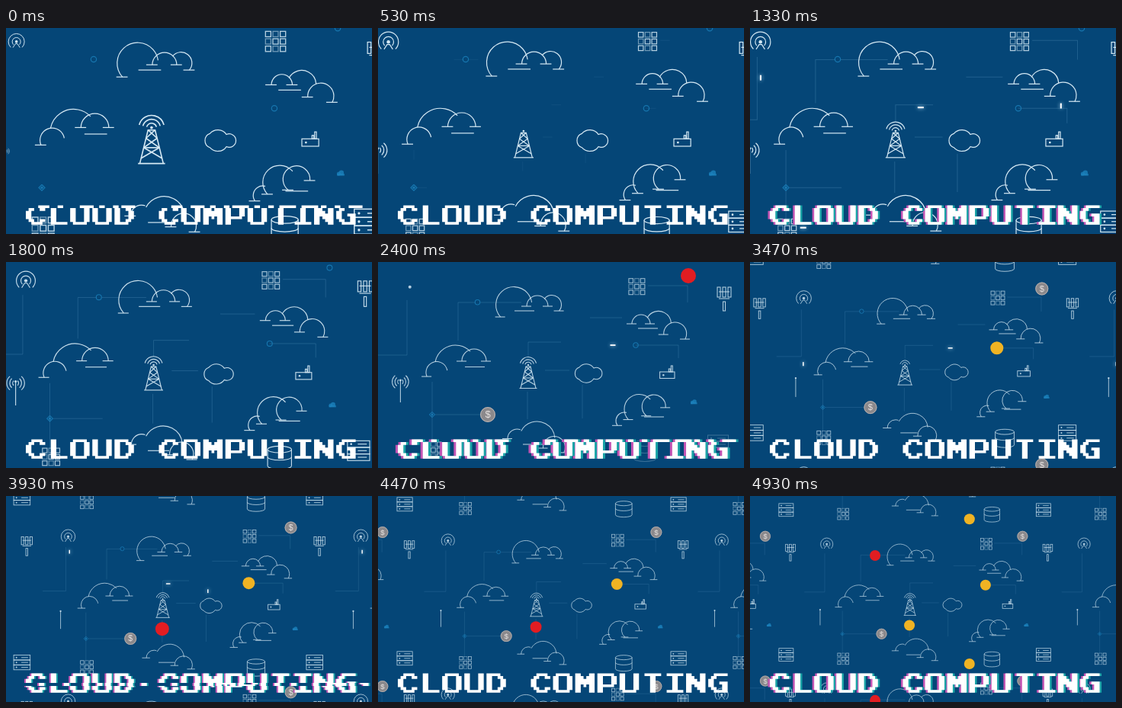
Animation of 480x270 px, one loop 4.99 s. Source, as an HTML page with a canvas:

```html
<!DOCTYPE html>
<html lang="en">
<head>
<meta charset="utf-8">
<title>Cloud computing</title>
<style>
html, body { margin: 0; width: 100%; height: 100%; overflow: hidden; background: #054677; }
canvas { display: block; width: 100vw; height: 100vh; }
</style>
</head>
<body>
<canvas id="stage" width="480" height="270">CLOUD COMPUTING</canvas>
<script>
const c = document.getElementById('stage').getContext('2d');
const LOOP = 4990, STEP = 66.6, W = 480, H = 270;
const BG = '#054677', INK = '#d6e9f4', DIM = '#1c82bd';
const RED = '#e21d22', GREY = '#8b898c', GOLD = '#f0b323';

const clamp = (v, lo = 0, hi = 1) => Math.min(hi, Math.max(lo, v));

// Linear interpolation through [time, value] keys
function key(t, keys) {
  let i = 1;
  while (i < keys.length - 1 && t > keys[i][0]) i++;
  const [t0, a] = keys[i - 1], [t1, b] = keys[i];
  return a + (b - a) * clamp((t - t0) / (t1 - t0));
}

const ZOOM = [[1330, 1.142], [2400, 1], [3130, .895], [3930, .8], [4930, .703]];

// Clouds: lobes [x, y, radius, from degree, to degree] and the start of the shading line
const CLOUDS = [
  { lobes: [[178.2, 56.2, 23.6, 138, 352], [209, 58, 14, 180, 360], [228, 56, 12.5, 218, 400]], shade: [179, 64] },
  { lobes: [[345, 81, 12, 180, 360], [367.8, 81, 16.6, 208, 356], [389.7, 94, 15, 176, 388]], shade: [341, 87] },
  { lobes: [[77, 144.6, 14, 157, 350], [101.6, 136, 27, 191, 316], [126, 130, 16, 180, 360]], shade: [114, 137.5] },
  { lobes: [[323, 208, 11, 145, 285], [342.5, 193, 19.5, 136, 319], [361.7, 189.5, 15.5, 128, 365]], shade: [349, 203] },
  { lobes: [[182.5, 231.5, 12.5, 180, 290], [208.5, 232.5, 23.5, 208, 355], [231, 243, 14.5, 176, 388]], shade: [190, 239] }
];

// Circuit elbows: x, y, horizontal run, vertical run
const ELBOWS = [
  [0, 122, 38, -72], [128, 53, -23, 50], [240, 105, -43, 20], [278, 73, 42, 0],
  [354, 31, 52, 22], [338, 109, 56, 17], [219, 142, 32, 0], [268, 161, 0, 44],
  [71, 157, 0, 80], [196, 170, 0, 36], [134, 53, 54, 0], [75, 200, 60, 0]
];

// Light pulses: x, y, the time they pass there, and whether they run sideways
const PULSES = [
  [387, 106, 1330, 0], [226, 108, 1330, 1], [42, 73.7, 1330, 0], [91, 246, 1330, 1],
  [308, 109, 2400, 1], [280, 109, 3130, 1], [41, 120, 3130, 0],
  [206, 110, 3930, 1], [44, 57.5, 3930, 0], [271, 122, 3930, 0]
];

// Coins: x, y, time of appearing, colour, then optionally a later time and colour
const COINS = [
  [407, 18, 2070, RED, 2700, GREY], [144, 200, 2000, GREY], [338, 109, 3040, GOLD],
  [196, 184, 3700, RED, 4500, GOLD], [132, 54, 4600, RED], [308, 256, 4600, GOLD]
];

// Title letters on a grid of 8 by 7 squares
const GLYPHS = {
  C: 'M2 0h4v1h1v1h-2v-1h-2v1h-1v3h1v1h2v-1h2v1h-1v1h-4v-1h-1v-1h-1v-3h1v-1h1z',
  L: 'M1 0h2v6h4v1h-6z',
  O: 'M1 0h5v1h1v5h-1v1h-5v-1h-1v-5h1zM2 1v5h3v-5z',
  U: 'M0 0h2v6h3v-6h2v6h-1v1h-5v-1h-1z',
  D: 'M0 0h5v1h1v1h1v3h-1v1h-1v1h-5zM2 1v5h2v-1h1v-3h-1v-1z',
  M: 'M0 0h2v1h1v1h1v-1h1v-1h2v7h-2v-3h-1v1h-1v-1h-1v3h-2z',
  P: 'M0 0h6v1h1v3h-1v1h-4v2h-2zM2 1v3h3v-3z',
  T: 'M1 0h6v1h-2v6h-2v-6h-2z',
  I: 'M1 0h6v1h-2v5h2v1h-6v-1h2v-5h-2z',
  N: 'M0 0h2v1h1v1h1v1h1v-3h2v7h-2v-1h-1v-1h-1v-1h-1v3h-2z',
  G: 'M2 0h5v1h-4v1h-1v3h1v1h2v-2h-1v-1h3v4h-5v-1h-1v-1h-1v-3h1v-1h1z'
};
const TITLE = new Path2D();
[...'CLOUD COMPUTING'].forEach((ch, i) =>
  GLYPHS[ch] && TITLE.addPath(new Path2D(GLYPHS[ch]), new DOMMatrix().translate(i * 8, 0)));

// Glitch bursts: time, colour fringe, top of the torn band, its shift
const BURSTS = [[0, 0, 232, 9], [2400, 3, 232, 11], [3130, 9, 245, 17], [3930, 2, 245, 17]];

function line(...p) {
  c.beginPath();
  for (let i = 0; i < p.length; i += 2) c.lineTo(p[i], p[i + 1]);
  c.stroke();
}
function arc(x, y, r, from = 0, to = 360) {
  c.beginPath();
  c.arc(x, y, r, from * Math.PI / 180, to * Math.PI / 180);
  c.stroke();
}
function dot(x, y, r) {
  c.beginPath();
  c.arc(x, y, r, 0, 7);
  c.fill();
}
// Draw around a pivot at a given size
function sized(x, y, k, draw) {
  c.save();
  c.translate(x, y);
  c.scale(k, k);
  draw();
  c.restore();
}

// Lobes that end at or below their centre stand on a short foot
function cloud({ lobes, shade: [sx, sy] }) {
  for (const [x, y, r, from, to] of lobes) {
    arc(x, y, r, from, to);
    for (const a of [from, to].map(d => d * Math.PI / 180)) {
      const fx = x + r * Math.cos(a), fy = y + r * Math.sin(a);
      if (fy > y - .1) line(fx - 7, fy, fx + 6, fy);
    }
  }
  line(sx, sy, sx + 26, sy);
}
const ROUND = new Path2D('M264 154A8.5 8.5 0 0 1 264 138A12 12 0 0 1 283 139A7.7 7.7 0 1 1 283 153A12 12 0 0 1 264 154z');

function tower(waves) {
  const half = y => 3 + (y + 9) / 28.5 * 7;
  const levels = [-9, -2, 6, 15];
  line(-10, 19.5, -3, -9, 3, -9, 10, 19.5);
  line(-11.5, 19.5, 11.5, 19.5);
  levels.slice(1).forEach((y, i) => {
    const top = levels[i], a = half(top), b = half(y);
    line(-a, top, b, y);
    line(a, top, -b, y);
  });
  line(-half(6), 6, half(6), 6);
  dot(0, -11, 1.2);
  for (let i = 1; i <= waves; i++) arc(0, -10.5, 1 + i * 3.3, 195, 345);
}
function grid() {
  for (let i = 0; i < 9; i++) {
    c.save();
    if (i % 2 && i !== 5) c.globalAlpha *= .6;
    c.strokeRect(-10.5 + i % 3 * 7.7, -10.5 + Math.floor(i / 3) * 7.7, 5.6, 5.6);
    c.restore();
  }
}
function server() {
  for (const y of [-12, -4, 4]) {
    c.strokeRect(-13.5, y, 27, 8);
    dot(-9, y + 4, 1.2);
    line(-1, y + 4, 10, y + 4);
  }
}
function database() {
  c.beginPath();
  c.ellipse(0, -10, 14.5, 4, 0, 0, 7);
  for (const y of [-1, 10]) {
    c.moveTo(14.5, y);
    c.ellipse(0, y, 14.5, 4, 0, 0, Math.PI);
  }
  c.stroke();
  for (const x of [-14.5, 14.5]) line(x, -10, x, 10);
}
function mast() {
  for (const x of [-9, -2, 5]) c.strokeRect(x, -16, 4, 13);
  for (const y of [-10, -1]) line(-7, y, 7, y);
  c.strokeRect(-1.5, 3, 3, 12);
}
function radio(open) {
  dot(0, 1, 2);
  if (!open) return;
  for (const r of [6, 11.5]) arc(0, 1, r, 135, 405);
  line(-5, 9.5, -1.5, 4, 1.5, 4, 5, 9.5);
}
function aerial(waves) {
  dot(0, -4, 1.4);
  line(0, -4, 0, 25);
  for (let i = 1; i <= waves; i++)
    for (const a of [0, 180]) arc(0, -2, i * 3.6, a - 50, a + 50);
}
function router() {
  c.strokeRect(-9.7, 0, 19.4, 8.5);
  dot(-5, 4.2, 1.2);
  c.strokeRect(2, -4, 2, 4);
  c.strokeRect(5, -8, 2, 8);
}

function markers() {
  c.strokeStyle = c.fillStyle = DIM;
  for (const [x, y] of [[130.5, 52.7], [338, 109], [410.8, 17]]) arc(x, y, 3.2);
  line(71, 196.5, 74.5, 200, 71, 203.5, 67.5, 200, 71, 196.5);
  dot(71, 200, 1.5);
  dot(412, 184, 2.2);
  dot(415, 183, 2.8);
  c.fillRect(410, 184, 8.5, 2.3);
}

function traces(t) {
  const p = clamp((t - 470) / 750);
  if (!p) return;
  c.save();
  c.strokeStyle = '#5f9cc4';
  c.globalAlpha = .1 + .2 * p;
  c.lineWidth = .9;
  c.setLineDash([130 * p, 400]);
  for (const [x, y, dx, dy] of ELBOWS) line(x, y, x + dx, y, x + dx, y + dy);
  c.restore();
}

function pulses(t) {
  c.save();
  c.fillStyle = '#fff';
  c.shadowColor = '#bfe6ff';
  c.shadowBlur = 5;
  for (const [x, y, at, flat] of PULSES) {
    const move = (t - at) * .04;
    if (Math.abs(move) > 16) continue;
    if (flat) c.fillRect(x - move - 3.5, y - .9, 7, 1.8);
    else c.fillRect(x - .9, y + move - 3, 1.8, 6);
  }
  c.restore();
}

function coins(t) {
  c.textAlign = 'center';
  c.textBaseline = 'middle';
  c.font = '13px Arial, "Liberation Sans", sans-serif';
  for (const [x, y, born, first, change, second] of COINS) {
    if (t < born) continue;
    const color = t >= change ? second : first;
    const size = key(t - born, [[0, .6], [80, 1.4], [300, 1]]);
    sized(x, y, size, () => {
      c.fillStyle = color;
      dot(0, 0, 10);
      if (color !== GREY) return;
      c.strokeStyle = '#c4bdba';
      c.lineWidth = .9;
      arc(0, 0, 9.4);
      c.fillStyle = '#e8e4e2';
      c.fillText('$', 0, .8);
    });
  }
}

function tile(t) {
  const pop = Math.max(0, 1 - t / 330) ** 2;
  const glow = key(t, [[1400, 1], [2300, .85]]);
  const hidden = clamp(1.5 - Math.abs(t - 2350) / 350);
  const waves = Math.min(3, Math.round(4.5 * Math.abs(Math.sin(Math.PI * (t - 530) / 2600))));
  c.lineWidth = 1.05;
  traces(t);
  c.globalAlpha = .8;
  markers();

  c.globalAlpha = glow;
  c.strokeStyle = c.fillStyle = INK;
  for (const shape of CLOUDS) {
    c.save();
    c.translate(pop * 600 / shape.lobes[1][0], pop);
    cloud(shape);
    c.restore();
  }
  c.stroke(ROUND);

  sized(197, 146, 1 + .35 * pop, () => tower(waves));
  sized(379.3, 144, 1, router);
  sized(41.8, 31.7, 1 - .2 * pop, () => radio(t < 2150 || t > 3350));
  sized(29.4, 159, 1 - .6 * pop, () => aerial(t < 3400 ? 3 : 0));
  sized(454, 49, 1, mast);
  c.globalAlpha = glow * .85;
  sized(339.4, 32.2, 1 + .1 * pop, grid);
  sized(72.5, 246.5, 1 + .2 * pop, grid);
  c.globalAlpha = glow * (1 - .7 * hidden);
  sized(446, 239, 1 + .2 * pop, server);
  sized(350, 247.5, 1 + .06 * pop, database);
  c.globalAlpha = 1;
  pulses(t);
  coins(t);
}

function title(t) {
  const burst = BURSTS.find(b => t >= b[0] - 70 && t < b[0] + 150);
  const calm = Math.sin(t / 1330 * Math.PI * 1.5) < -.6 && t > 1000 ? 2.5 : 0;
  const [, fringe, top, shift] = burst || [0, calm, H, 0];
  const put = (dx, color) => {
    c.save();
    c.translate(26 + dx, 232.4);
    c.scale(3.635, 3.635);
    c.fillStyle = color;
    c.fill(TITLE, 'evenodd');
    c.restore();
  };
  const strip = (y, h, dx) => {
    c.save();
    c.beginPath();
    c.rect(0, y, W, h);
    c.clip();
    if (fringe) {
      put(dx - fringe, '#c455b4');
      put(dx + fringe, '#1aa3a6');
    }
    put(dx, '#fff');
    c.restore();
  };
  strip(0, top, 0);
  strip(top, 4, shift);
  strip(top + 4, H, 0);
}

function draw(now) {
  const step = Math.min(74, Math.floor((now % LOOP + 4) / STEP));
  const t = step * 200 / 3;
  const s = key(t, ZOOM);
  c.fillStyle = BG;
  c.fillRect(0, 0, W, H);
  for (let i = -1; i <= 1; i++)
    for (let j = -1; j <= 1; j++) {
      c.save();
      c.translate(W / 2, H / 2);
      c.scale(s, s);
      c.translate(i * W - W / 2, j * H - H / 2);
      tile(t);
      c.restore();
    }
  title(t);
}

const start = performance.now();
function frame() {
  draw(performance.now() - start);
  requestAnimationFrame(frame);
}
frame();
</script>
</body>
</html>
```
